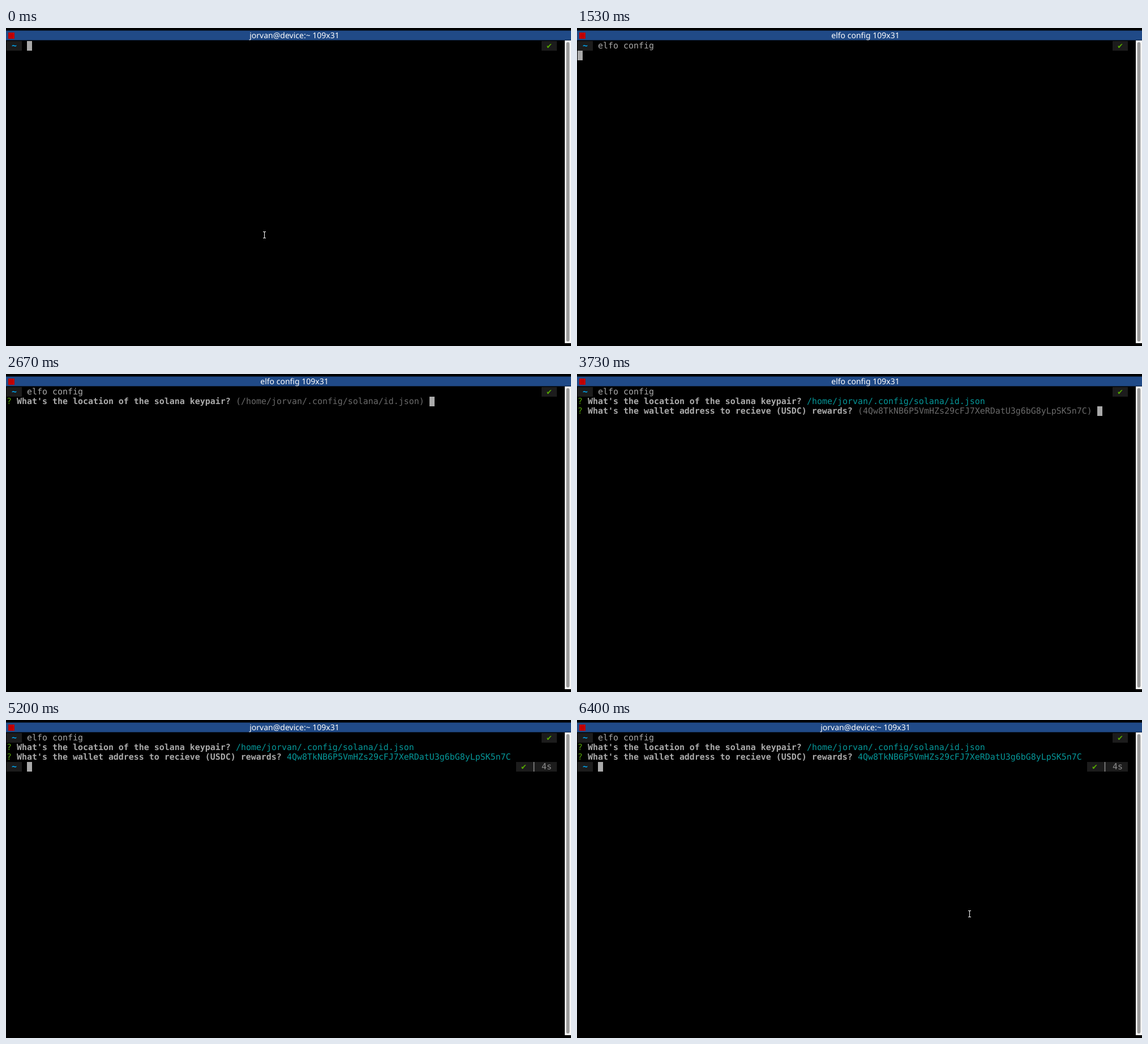
These frames come from a looping animation (998x561 px, 6.43 s). An HTML page with a canvas:

```html
<!DOCTYPE html>
<html lang="en">
<head>
<meta charset="utf-8">
<title>Terminal</title>
<style>
  html, body { margin: 0; width: 100%; height: 100%; overflow: hidden; background: #000; }
  canvas { display: block; }
</style>
</head>
<body>
<canvas id="stage" width="998" height="561"></canvas>
<script>
const ctx = document.getElementById('stage').getContext('2d');
ctx.textRendering = 'geometricPrecision';
const LOOP = 6430, CELL = 9, ROW = 17;
const FG = '#aaaaaa', GHOST = '#525252', DIM = '#6a6a6a', GREEN = '#4e9a06', CYAN = '#06989a';
const COMMAND = 'elfo config';
const USER = 'jorvan';
const KEYPAIR = `/home/${USER}/.config/solana/id.json`;
const WALLET = '4Qw8TkNB6P5VmHZs29cFJ7XeRDatU3g6bG8yLpSK5n7C';
const ASK_KEY = "What's the location of the solana keypair? ";
const ASK_WALLET = "What's the wallet address to recieve (USDC) rewards? ";

// Moments of each event, in ms
const KEYS = [130, 400, 530, 670];
const ACCEPT = 1230, RUN = 1330, ASK1 = 1900, ASK2 = 3230, DONE = 4970, MOUSE = 6390;
const HIDDEN = [[1930, 2670], [3930, 4500], [5630, 6300]];

const colX = col => 1 + col * CELL;
const rowY = row => 23 + row * ROW;

function box(x, y, w, h, color) {
  ctx.fillStyle = color;
  ctx.fillRect(x, y, w, h);
}

function write(col, row, text, color, weight = '') {
  ctx.font = `${weight} 14.95px "DejaVu Sans Mono", monospace`;
  ctx.fillStyle = color;
  ctx.fillText(text, colX(col), rowY(row) + 13);
}

function segment(col, row, cells) {
  box(colX(col), rowY(row), cells * CELL, ROW, '#1c1c1c');
}

function prompt(row, seconds) {
  segment(0, row, 3);
  write(1, row, '~', '#00a5ee', 'bold');
  const start = seconds ? 100 : 105;
  segment(start, row, 108 - start);
  write(start + 1, row, '✔', '#55a800');
  if (seconds) {
    box(931.8, rowY(row), 1.4, ROW, '#949494');
    write(105, row, seconds, '#8e8e8e');
  }
}

function question(row, ask, answer, done) {
  write(0, row, '?', GREEN);
  write(2, row, ask, FG, 'bold');
  write(2 + ask.length, row, done ? answer : `(${answer})`, done ? CYAN : DIM);
  return ask.length + answer.length + 5;
}

function frame(running) {
  box(0, 0, 998, 561, '#000');
  box(0, 4.5, 998, 17, '#204a87');
  box(4, 8, 11, 11, '#c00000');
  ctx.font = '14px "Noto Sans", "Open Sans", sans-serif';
  ctx.fillStyle = '#fff';
  ctx.textAlign = 'center';
  ctx.fillText(`${running ? COMMAND : USER + '@device:~'} 109x31`, 509.5, 18);
  ctx.textAlign = 'left';
  box(987, 22, 11, 534, '#f6f6f6');
  ctx.fillStyle = '#9a9a9a';
  ctx.beginPath();
  ctx.roundRect(989.6, 25, 5.8, 528, 2.9);
  ctx.fill();
}

function mouse(x, y) {
  box(x - 0.5, y - 6, 1, 12, '#fff');
  box(x - 2.5, y - 6, 5, 1, '#fff');
  box(x - 2.5, y + 5, 5, 1, '#fff');
}

function draw(t) {
  frame(t >= RUN && t < DONE);
  prompt(0);

  const typed = t >= ACCEPT ? COMMAND.length : KEYS.filter(k => t >= k).length;
  const ghost = typed > 0 && typed < COMMAND.length;
  let col = 4 + typed, row = 0;
  write(4, 0, COMMAND.slice(0, typed), FG);
  if (ghost) write(col, 0, COMMAND.slice(typed), GHOST);

  if (t >= RUN) { col = 0; row = 1; }
  if (t >= ASK1) col = question(1, ASK_KEY, KEYPAIR, t >= ASK2);
  if (t >= ASK2) { col = question(2, ASK_WALLET, WALLET, t >= DONE); row = 2; }
  if (t >= DONE) { prompt(3, '4s'); col = 4; row = 3; }

  if (!HIDDEN.some(([from, to]) => t >= from && t < to)) {
    box(colX(col), rowY(row), CELL, ROW, ghost ? GHOST : FG);
    if (ghost) write(col, 0, COMMAND[typed], '#000');
  }
  if (t < KEYS[0]) mouse(456.5, 365);
  if (t >= MOUSE) mouse(693.5, 342);
}

const begin = performance.now();
function tick() {
  draw((performance.now() - begin) % LOOP);
  requestAnimationFrame(tick);
}
tick();
</script>
</body>
</html>
```
